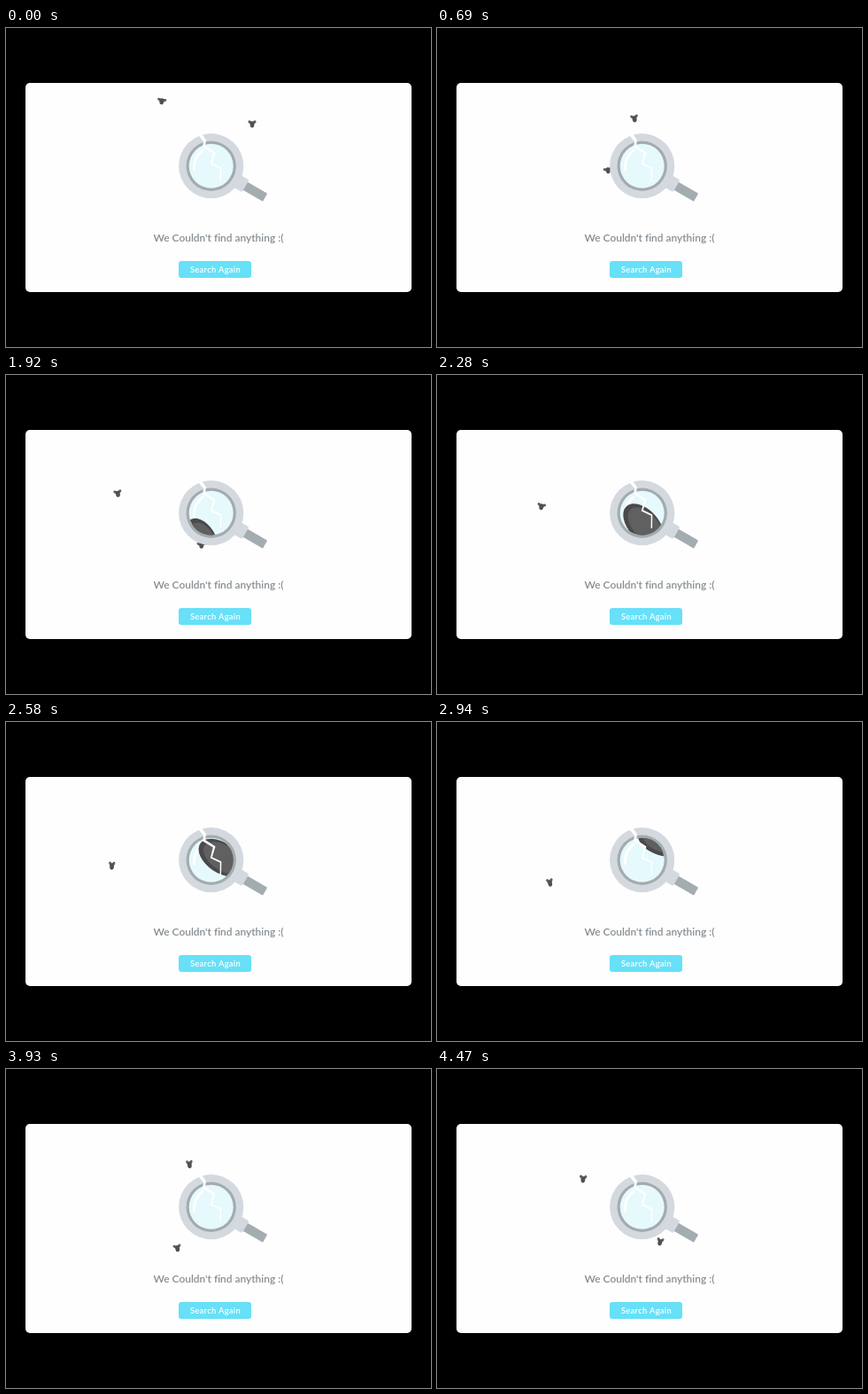
Animation, 480 px wide and 360 px high, one loop 4.5 s. Source, as an HTML page:

```html
<!DOCTYPE html>
<html lang="en">
<head>
<meta charset="utf-8">
<title>Nothing found</title>
<style>
  html, body { margin: 0; width: 100%; height: 100%; overflow: hidden; background: #000; }
  svg { display: block; width: 100vw; height: 100vh; }
  text { font-family: Lato, "Open Sans", sans-serif; font-weight: 600; text-anchor: middle; font-variant-ligatures: none; }
</style>
</head>
<body>
<svg viewBox="0 0 480 360">
  <defs>
    <clipPath id="lens"><circle r="25"/></clipPath>
    <ellipse id="body" cy=".8" rx="2.4" ry="3.6" fill="#505050"/>
    <ellipse id="wing" cy="-2.8" rx="1.6" ry="2.6" fill="#606060"/>
  </defs>

  <rect width="480" height="360"/>
  <rect x="22" y="62" width="436" height="236" rx="5" fill="#fefefe"/>

  <g class="fly"><use class="wing" href="#wing"/><use class="wing" href="#wing"/><use href="#body"/></g>
  <g class="fly"><use class="wing" href="#wing"/><use class="wing" href="#wing"/><use href="#body"/></g>

  <g transform="translate(231.7 155.7)">
    <g transform="rotate(30.3)">
      <rect x="44" y="-5.2" width="26.5" height="10.4" rx="1" fill="#a3adaf"/>
      <rect x="33" y="-8" width="12" height="16" rx="2" fill="#d4d9df"/>
    </g>
    <circle r="36.6" fill="#d4d9df"/>
    <circle r="28.2" fill="#a3abae"/>
    <circle r="25" fill="#e6f9fc"/>
    <path d="M-19.2 4.3 Q-20.2 -9.7 -9.7 -17.7" fill="none" stroke="#fff" stroke-width="3" stroke-linecap="round"/>
    <g clip-path="url(#lens)">
      <g id="big">
        <ellipse rx="28.5" ry="17" fill="#4a4a4a"/>
        <ellipse cx="2" cy="-1" rx="25" ry="14" fill="#606060"/>
      </g>
    </g>
  </g>
  <path d="M217.5 121.5 L221 119.5 L226 126.5 L225 133 L236.5 140.5 L232.8 152.5 L243.3 157.5 L243 173 L241.6 173 L241.8 158.8 L230.8 153.6 L233.8 141.5 L222.2 134.5 L223 128 Z" fill="#fff"/>

  <text x="240" y="241.3" font-size="11.95" fill="#868d92">We Couldn't find anything :(</text>
  <rect x="195" y="263" width="82" height="19" rx="3" fill="#67e0f8"/>
  <text x="236.5" y="275.8" font-size="9.4" letter-spacing=".3" fill="#fff">Search Again</text>
</svg>
<script>
const LOOP = 4.5, STEP = 0.03;

// Key points of each flight: seconds, x, y
const flights = [
  [[0, 278, 108], [0.69, 223, 102], [1.41, 155, 116], [2.28, 118, 148], [3.45, 151, 201], [4.47, 252, 195]],
  [[0, 176, 82], [0.69, 193, 160], [1.41, 212, 211], [3.45, 232, 105], [4.47, 165, 124]]
];

const flies = document.querySelectorAll(".fly");
const big = document.getElementById("big");

// Smooth curve through keys at uneven times
function along(keys, t) {
  const last = keys.length - 1;
  const i = Math.max(0, keys.findLastIndex((k, n) => n < last && k[0] <= t));
  const a = keys[i], b = keys[i + 1], span = b[0] - a[0];
  const u = (t - a[0]) / span, v = 1 - u;
  const slope = (k, c) => {
    const p = keys[Math.max(0, k - 1)], n = keys[Math.min(last, k + 1)];
    return (n[c] - p[c]) / (n[0] - p[0]);
  };
  return [1, 2].map(c =>
    (1 + 2 * u) * v * v * a[c] + (1 + 2 * v) * u * u * b[c] +
    u * v * span * (v * slope(i, c) - u * slope(i + 1, c)));
}

function place(el, x, y, turn) {
  el.setAttribute("transform", `translate(${x} ${y}) rotate(${turn})`);
}

function draw(seconds) {
  const t = Math.floor((seconds % LOOP) / STEP) * STEP;

  flies.forEach((fly, i) => {
    const [x, y] = along(flights[i], t);
    place(fly, x, y, 12 * Math.sin(6 * t + i));
    const spread = 55 + 20 * Math.sin(36 * t + 2 * i);
    fly.querySelectorAll(".wing").forEach((wing, side) =>
      wing.setAttribute("transform", `rotate(${side ? spread : -spread})`));
  });

  // The magnified fly drifts straight across the lens, turning as it goes
  const u = (t - 2.28) / 0.66;
  place(big, 1.5 + 21.5 * u, 13.5 - 35.5 * u, 48 - 31 * u);
}

const start = performance.now();
function tick() {
  draw((performance.now() - start) / 1000);
  requestAnimationFrame(tick);
}
tick();
</script>
</body>
</html>
```
